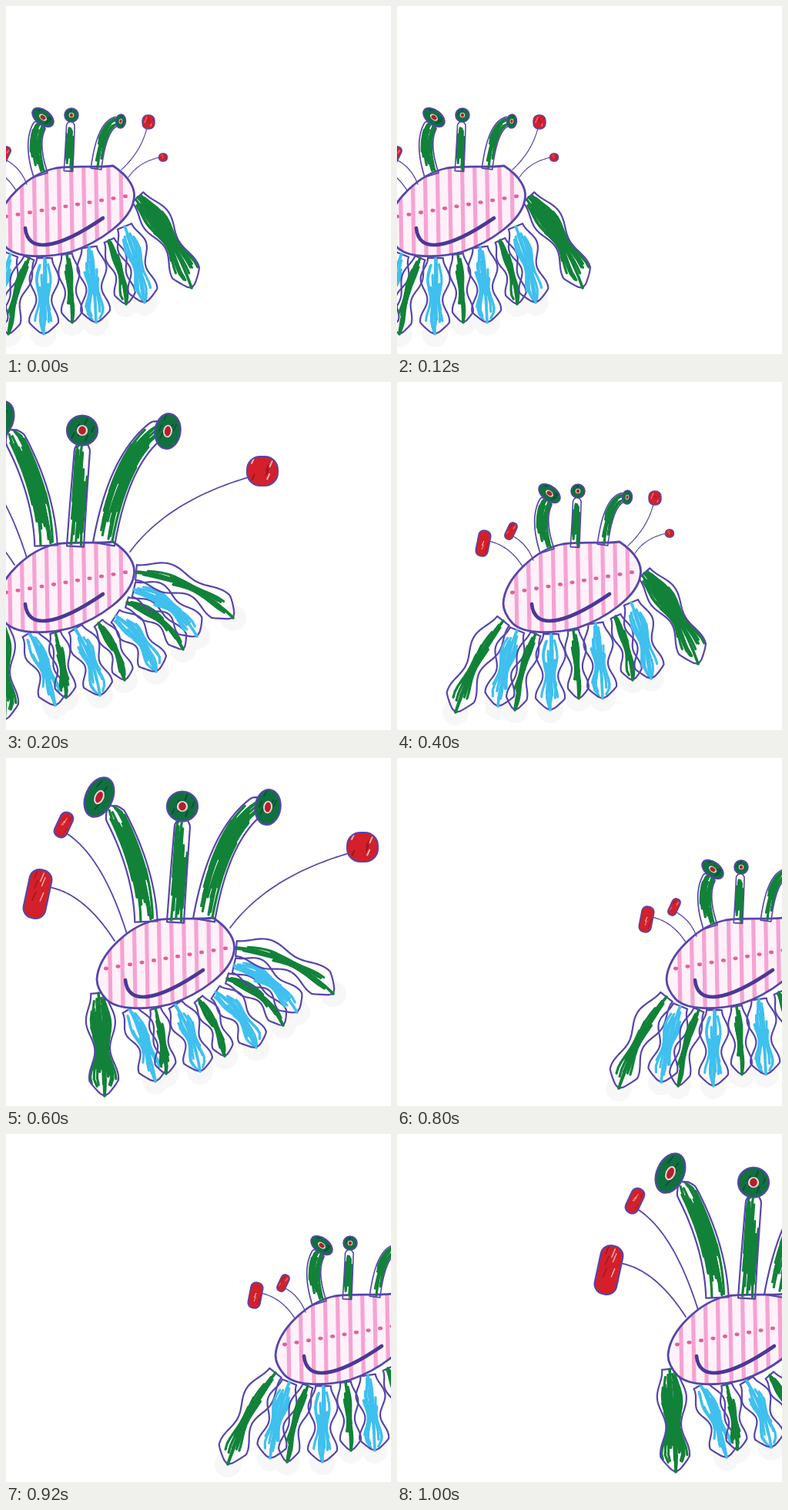
Recreate the animation shown at these times as an HTML page with a canvas. Size 500x453 px, loop 1.2 s.

```html
<!DOCTYPE html>
<html lang="en">
<head>
<meta charset="utf-8">
<title>Dancing creature</title>
<style>
html, body { margin: 0; width: 100%; height: 100%; overflow: hidden; background: #fff; }
canvas { display: block; }
</style>
</head>
<body>
<canvas id="stage" width="500" height="453"></canvas>
<script>
const ctx = document.getElementById('stage').getContext('2d');
const INK = '#5745ac', GREEN = '#128239', BLUE = '#3fc0ee', RED = '#d3202a', EYE = '#10703f';
const STEP = 200;
const shifts = [-150, -150, 0, -20, 212, 214];

let seed;
const rand = (lo = 0, hi = 1) => {
  seed = seed * 16807 % 2147483647;
  return lo + (hi - lo) * seed / 2147483647;
};
const pairs = s => s.split(' ').map(p => p.split(',').map(Number));

function pen(path, width, color = INK) {
  ctx.lineWidth = width;
  ctx.strokeStyle = color;
  ctx.stroke(path);
}

function clipped(path, paint) {
  ctx.save();
  ctx.clip(path);
  paint();
  ctx.restore();
}

// Quadratic arc: at(t, off) is the point at t, moved sideways by off
function spine([ax, ay], [cx, cy], [bx, by]) {
  return (t, off = 0) => {
    const u = 1 - t;
    const dx = u * (cx - ax) + t * (bx - cx), dy = u * (cy - ay) + t * (by - cy);
    const k = off / Math.hypot(dx, dy);
    return [u * u * ax + 2 * u * t * cx + t * t * bx + dy * k,
      u * u * ay + 2 * u * t * cy + t * t * by - dx * k];
  };
}

function trace(point, steps = 40) {
  const path = new Path2D();
  for (let i = 0; i <= steps; i++) path.lineTo(...point(i / steps));
  return path;
}

// Pen outline around a spine, filled with loose marker strokes
function limb(at, half, color, cover, strokes, ink) {
  const edge = trace(t => t < 0.5
    ? at(2 * t, half(2 * t))
    : at(2 - 2 * t, -half(2 - 2 * t)), 80);
  clipped(edge, () => {
    for (let i = 0; i < strokes; i++) {
      const lane = (i * 0.618 % 1 * 2 - 1) * cover, drift = rand(-0.2, 0.2);
      const from = rand(0, 0.45), span = rand(0.4, 0.6);
      pen(trace(s => {
        const t = Math.min(1, from + span * s);
        return at(t, half(t) * (lane + drift * s));
      }, 8), 3.2, color);
    }
  });
  edge.closePath();
  pen(edge, ink);
}

// Each leg has a narrow top, two lobes and a round tip; sideways legs arch upward
function legs({ roots, tips, full }) {
  const ends = pairs(tips);
  ends.forEach(([x, y], i) => i === full || disc(x, y, 17, 17, 0, '#f8f7f8'));
  pairs(roots).forEach(([x, y], i) => {
    const [tx, ty] = ends[i], dx = tx - x, dy = ty - y, len = Math.hypot(dx, dy);
    const arch = 28 * dx / len / len;
    const at = spine([x, y], [(x + tx) / 2 + dy * arch, (y + ty) / 2 - dx * arch], [tx, ty]);
    const blue = i % 2 === 1, wide = i === full;
    const w = wide || blue || i === 0 || i === 8 ? 38 : 27;
    const half = t => w / 2 * (0.76 - 0.24 * Math.cos(t / 0.55 * 2 * Math.PI))
      * Math.sqrt(Math.min(1, (1 - t) / 0.15));
    limb(at, half, blue ? BLUE : GREEN, wide ? 0.75 : blue ? 0.55 : 0.32, wide ? 30 : blue ? 14 : 12, 2.2);
    pen(trace(at), 3.6, blue ? BLUE : GREEN);
  });
}

function disc(x, y, rx, ry, turn, fill, ink, boxy) {
  const path = new Path2D();
  if (boxy) path.roundRect(-rx, -ry, 2 * rx, 2 * ry, Math.min(rx, ry) * 0.9);
  else path.ellipse(0, 0, rx, ry, 0, 0, 7);
  ctx.save();
  ctx.translate(x, y);
  ctx.rotate(turn * Math.PI / 180);
  ctx.fillStyle = fill;
  ctx.fill(path);
  if (ink) {
    clipped(path, () => {
      for (let i = 0; i < 6; i++) {
        const px = rand(-rx, rx) * 0.7, py = rand(-ry, ry) * 0.7;
        const color = fill === EYE ? '#0a5038' : i % 2 ? '#f3b4b4' : '#9c1722';
        pen(new Path2D(`M${px} ${py}l${rx * 0.15} ${-ry * 0.35}`), rx * 0.1, color);
      }
    });
    pen(path, ink);
  }
  ctx.restore();
}

function stalk(line, width, ink, x, y, rx, ry, turn) {
  const half = t => width / 2 * (1.05 - 0.1 * t) * Math.sqrt(Math.min(1, (1 - t) / 0.08));
  limb(spine(...pairs(line)), half, GREEN, 0.72, width * 1.1, ink);
  disc(x, y, rx, ry, turn, EYE, ink);
  disc(x, y, rx * 0.36, ry * 0.36, turn, '#ecd3da');
  disc(x, y, rx * 0.24, ry * 0.28, turn, '#b51f2c');
}

function antenna(line, ink, x, y, rx, ry, turn) {
  pen(trace(spine(...pairs(line))), ink);
  disc(x, y, rx, ry, turn, RED, ink * 1.2, true);
}

function body() {
  const edge = new Path2D('M138 288C140 255 180 218 215 211C240 207 265 211 289 208C310 222 319 238 316 252C312 280 270 308 235 320C205 328 165 329 150 314C142 305 138 297 138 288Z');
  ctx.fillStyle = '#fef1f9';
  ctx.fill(edge);
  clipped(edge, () => {
    for (let x = 155; x < 305; x += 16.1)
      pen(new Path2D(`M${x - 1} 205L${x + 1} 330`), 5.2, '#f5a3d2');
  });
  for (let x = 150; x < 315; x += 15.5)
    disc(x, 274 - (x - 150) * 0.17, 3, 2.4, 0, '#e2609f');
  pen(edge, 2.8);
  pen(new Path2D('M175 289C178 322 215 318 276 276'), 4.6, '#4a3897');
}

const relaxed = {
  roots: '138,311 156,323 180,328 200,328 229,323 258,314 284,305 304,287 321,249',
  tips: '76,430 131,422 153,427 199,427 236,412 267,412 306,388 330,386 391,367',
  full: 8,
  top() {
    stalk('195,220 180,174 196,152', 18, 1.7, 198, 145, 16, 9.5, 38);
    stalk('231,215 233,180 234,150', 11, 1.6, 235, 142, 9, 9, 0);
    stalk('267,212 275,150 297,150', 13, 1.6, 299, 150, 6.5, 9, 5);
    antenna('300,213 325,190 333,159', 1.2, 335, 151, 8, 9, 0);
    antenna('309,223 322,203 350,197', 1.1, 354, 197, 5.5, 5.2, 0);
    antenna('119,207 146,213 163,240', 1.3, 112, 210, 8, 17, 11);
    antenna('151,201 169,211 177,232', 1.3, 148, 194, 5.5, 11.5, 25);
  }
};

const stretched = {
  roots: '120,306 160,327 194,326 220,321 250,314 272,305 287,287 296,270 299,248',
  tips: '128,440 194,421 208,411 252,408 284,388 325,377 360,348 378,331 425,307',
  full: 0,
  top() {
    stalk('182,213 179,140 135,62', 28, 2.2, 121, 51, 17.5, 27, 24);
    stalk('220,214 224,150 230,76', 21, 2.2, 229, 63, 20, 19.5, 0);
    stalk('257,211 278,90 336,56', 27, 2.2, 340, 64, 16.5, 23, 8);
    antenna('291,221 340,155 445,124', 1.7, 463, 116, 20, 19, 0);
    antenna('56,168 102,177 141,238', 1.8, 41, 177, 14.5, 32, 12);
    antenna('80,99 126,130 157,229', 1.8, 75, 87, 8.5, 17, 25);
  }
};

function draw(now) {
  const step = Math.floor(now / STEP) % shifts.length;
  const odd = step % 2, pose = odd ? stretched : relaxed;
  const x = shifts[step];
  const place = left => ctx.setTransform(1, 0, 0, 1, left, 0);
  seed = 7;
  place(0);
  ctx.clearRect(0, 0, 500, 453);
  ctx.lineCap = ctx.lineJoin = 'round';
  place(x + odd * 20);
  legs(pose);
  place(x);
  body();
  place(x + odd * 20);
  pose.top();
  requestAnimationFrame(draw);
}
requestAnimationFrame(draw);
</script>
</body>
</html>
```
